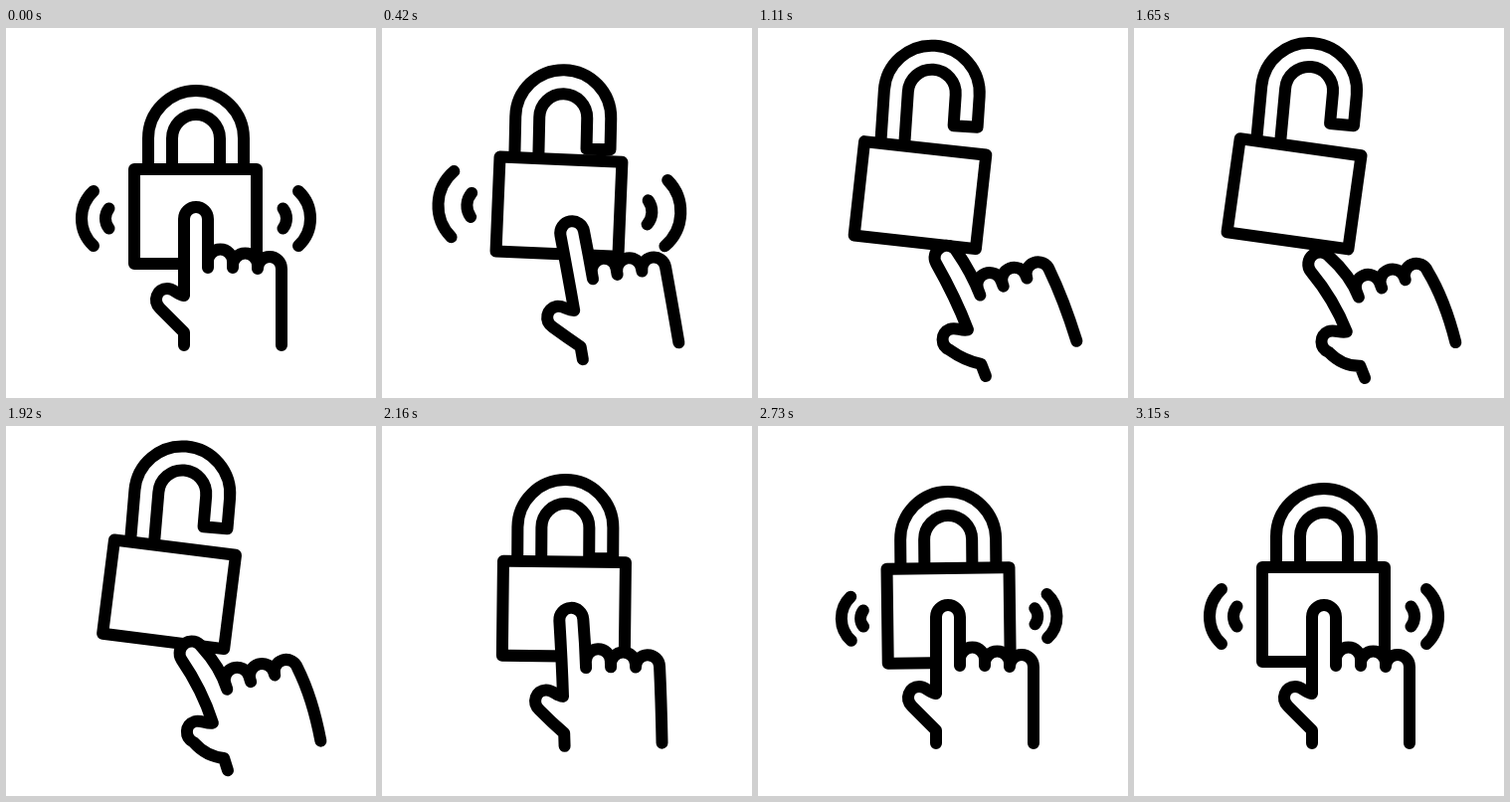
An HTML page that plays this animation: 372 by 372 pixels, repeating every 3300 ms.

```html
<!DOCTYPE html>
<html>
<head>
<meta charset="utf-8">
<title>Unlock</title>
<style>
  html, body { margin: 0; width: 100%; height: 100%; overflow: hidden; background: #fff; }
  svg { display: block; width: 100vw; height: 100vh; }
</style>
</head>
<body>
<svg viewBox="0 0 372 372" fill="none" stroke="#000" stroke-width="12" stroke-linecap="round" stroke-linejoin="round">
  <defs>
    <path id="wave" vector-effect="non-scaling-stroke" d="M88 164a37.5 37.5 0 0 0 0 55M103.500 181.500a16 16 0 0 0 0 20"/>
  </defs>
  <g id="lock">
    <path id="shackle" d="M143 175V111a48 48 0 0 1 96 0V142H215V111a24 24 0 0 0 -48 0V175"/>
    <path d="M129 142H252V237H129Z" fill="#fff"/>
    <g id="waves">
      <use class="side" href="#wave"/>
      <g transform="matrix(-1 0 0 1 382 0)"><use class="side" href="#wave"/></g>
    </g>
  </g>
  <path id="hand" fill="#fff"/>
</svg>
<script>
const LOOP = 3300;
const $ = id => document.getElementById(id);
const sides = document.querySelectorAll('.side');
const set = (el, name, value) => el.setAttribute(name, value);

const ramp = (t, from, to) => Math.min(1, Math.max(0, (t - from) / (to - from)));
const ease = (t, from, to) => {
  const u = ramp(t, from, to);
  return u * u * (3 - 2 * u);
};

// Swing out, drift on slowly, then return; a recoil passes rest and settles.
function swing(t, out, drift, recoil = 0, home = 2420) {
  return out * ease(t, 165, 690) + drift * ramp(t, 690, 1800)
    + (recoil - out - drift) * ease(t, 1800, home)
    - recoil * ease(t, home, 2850);
}

function drawLock(t) {
  const x = swing(t, -26, -4, 6);
  const y = swing(t, -20.5, -2.5, 5);
  const turn = swing(t, 5, 3.4, -4);
  const lift = swing(t, 23, 4, -11);
  set($('lock'), 'transform', `translate(${x} ${y}) rotate(${turn} 190.5 189.5)`);
  set($('shackle'), 'transform', `translate(0 ${-lift}) rotate(${-lift / 10} 191 111)`);
}

function drawWaves(t) {
  const leaving = t < 960;
  const scale = leaving
    ? 1 + 0.85 * ramp(t, 250, 960)
    : 1 - (1 - ramp(t, 2430, 3150)) ** 3;
  set($('waves'), 'opacity', leaving ? Math.min(1, (960 - t) / 400) : +(scale > 0));
  for (const side of sides) {
    set(side, 'transform', `translate(110 191.5) scale(${scale}) translate(-110 -191.5)`);
  }
}

// The index finger leans left by the given angle; thumb and wrist bow with it.
function handPath(bend) {
  const lean = bend * Math.PI / 180, length = 63 - bend * 0.25;
  const x = 191 - length * Math.sin(lean), y = 255 - length * Math.cos(lean);
  const dx = 12 * Math.cos(lean * 1.5), dy = 12 * Math.sin(lean * 1.5);
  return `M179 319V306Q${167 - bend * 0.4} ${294 + bend * 0.5} 155 282
    C147 274 152 262 162 262C169 262 172 268 179 269
    Q179 234 ${x - dx} ${y + dy}A12 12 0 0 1 ${x + dx} ${y - dy}Q203 217 203 241
    V235a12.5 12.5 0 0 1 25 0V241V239a12.5 12.5 0 0 1 25 0V241V242a12 12 0 0 1 24 0
    Q${277 + bend * 0.5} 275 277 319`;
}

function drawHand(t) {
  const move = (out, drift) => swing(t, out, drift, 0, 2240);
  set($('hand'), 'transform',
    `translate(${move(47.5, 6.5)} ${move(29.5, 4)}) rotate(${move(-20.7, -0.9)} 179 319)`);
  set($('hand'), 'd', handPath(move(1, 12)));
}

const start = performance.now();
function tick() {
  const t = (performance.now() - start) % LOOP;
  drawLock(t);
  drawWaves(t);
  drawHand(t);
  requestAnimationFrame(tick);
}
tick();
</script>
</body>
</html>
```
